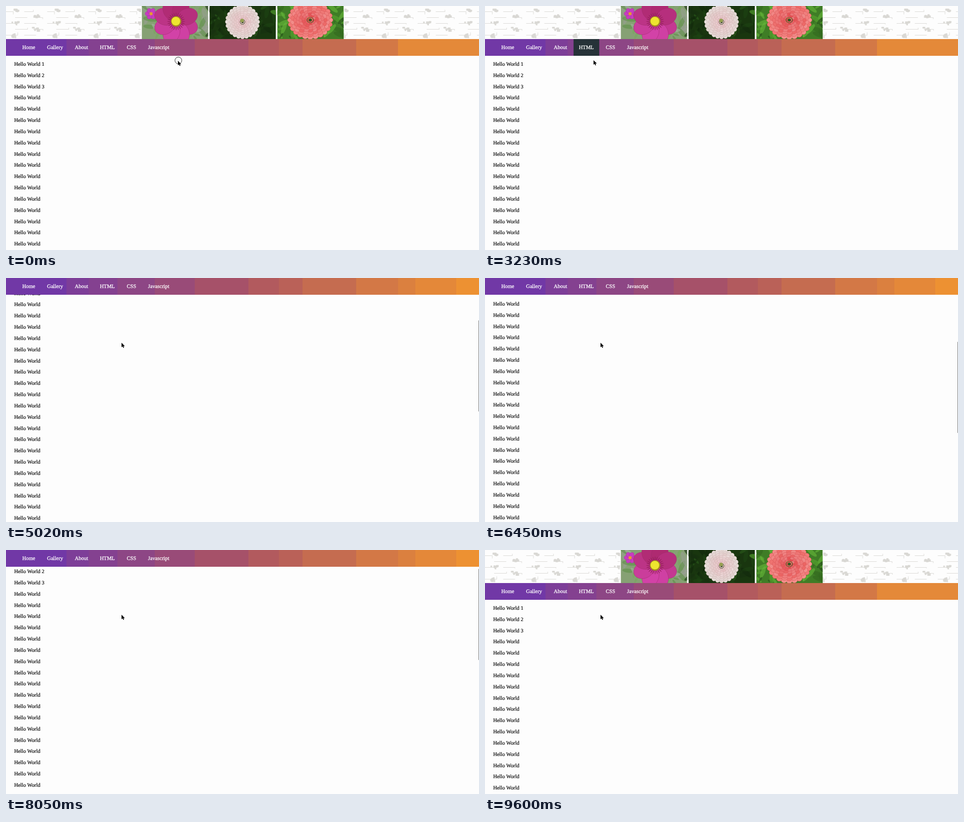
These frames come from a looping animation (1040 px wide and 539 px high, 9830 ms). An HTML page:

```html
<!DOCTYPE html>
<html lang="en">
<head>
<meta charset="utf-8">
<title>Sticky navigation</title>
<style>
  html, body { margin: 0; width: 100%; height: 100%; overflow: hidden; background: #fdfdfd; }
  svg { display: block; width: 100%; height: 100%; }
  text { font: 11.68px "Liberation Serif", "Times New Roman", serif; text-rendering: geometricPrecision; stroke: #000; stroke-width: .2px; }
  #nav text { fill: #fff; stroke: #fff; stroke-width: .3px; }
</style>
</head>
<body>
<svg viewBox="0 0 1040 539">
  <defs>
    <pattern id="bricks" width="90.5" height="73" patternUnits="userSpaceOnUse"></pattern>
    <clipPath id="photoClip"><path d="M298.5 0h146v73h-146zM447.5 0h146v73h-146zM596.5 0h146v73h-146z"/></clipPath>
  </defs>
  <g id="header">
    <rect width="1040" height="73" fill="url(#bricks)"/>
    <rect x="297" width="447" height="73" fill="#fdfdfd"/>
    <g id="photos" clip-path="url(#photoClip)"></g>
  </g>
  <g id="rows"></g>
  <g id="nav"></g>
  <rect id="bar" x="1039" y="2" width="1" height="201" fill="#707070"/>
  <circle id="ring" cx="379" cy="120.3" r="7.5" fill="none" stroke="#222"/>
  <path id="cursor" d="M0 0V10L2.4 8 4 11.5 5.6 10.8 4.2 7.4H7.3Z" stroke="#fff" stroke-width=".8" paint-order="stroke"/>
</svg>
<script>
const LOOP = 9830, NAV_Y = 73, NAV_H = 37, ROW = 24.83;
const $ = id => document.getElementById(id);

function add(parent, tag, attrs, text) {
  const node = document.createElementNS('http://www.w3.org/2000/svg', tag);
  for (const key in attrs) node.setAttribute(key, attrs[key]);
  if (text) node.textContent = text;
  return parent.appendChild(node);
}

let seed = 7;
function random(low, high) {
  seed = seed * 16807 % 2147483647;
  return low + (high - low) * seed / 2147483647;
}
const pick = list => list[Math.floor(random(0, list.length))];
const mix = (a, b, p) => a.map((v, i) => v + (b[i] - v) * p);
const rgb = c => `rgb(${c.map(Math.round)})`;

// Wallpaper: broken brick lines with rough blots
const wall = $('bricks'), GREY = '#d9d8d4';
for (let y = 12.5, i = 0; y < 73; y += 13, i++) {
  for (let x = i % 2 * 20; x < 80; x += 40) {
    add(wall, 'path', { d: `M${x} ${y}h${random(16, 30)}v${random(-7, 7)}`, fill: 'none', stroke: GREY });
  }
}
for (let i = 0; i < 5; i++) {
  const x = i % 2 * 45 + 20, y = 9 + i * 14;
  for (let k = 0; k < 6; k++) {
    add(wall, 'rect', { x: x + random(-9, 4), y: y + random(-5, 1), width: random(3, 8), height: random(3, 6), rx: 1, fill: GREY });
  }
}

// Photos
const photos = $('photos');
function backdrop(index, base, leaves) {
  const left = 298.5 + 149 * index;
  add(photos, 'rect', { x: left, width: 146, height: 73, fill: base });
  for (let i = 0; i < 60; i++) {
    const length = random(12, 34);
    add(photos, 'ellipse', {
      rx: length / 2, ry: length / 6, fill: pick(leaves), opacity: .6,
      transform: `translate(${left + random(0, 146)} ${random(0, 73)}) rotate(${random(0, 360)})`
    });
  }
}
function petal(cx, cy, angle, near, far, width, fill, stroke = 'none', squash = 1) {
  add(photos, 'ellipse', {
    cx: (near + far) / 2, rx: (far - near) / 2, ry: width, fill, stroke, 'stroke-width': .5,
    transform: `translate(${cx} ${cy}) scale(1 ${squash}) rotate(${angle})`
  });
}
function dahlia(cx, cy, radius, squash, outer, inner, edge) {
  const rings = 8;
  for (let i = 0; i < rings; i++) {
    const far = radius * (1 - i / rings), count = 24 - 2 * i;
    for (let k = 0; k < count; k++) {
      const colour = mix(mix(outer, inner, i / rings), [255, 255, 255], random(0, .25));
      petal(cx, cy, (k + i % 2 / 2) * 360 / count, far * .6, far, far * 3.6 / count, rgb(colour), edge, squash);
    }
  }
}

backdrop(0, '#86a174', ['#5f9148', '#a7b3a5', '#78a85e', '#9a9f94']);
for (let a = 0; a < 360; a += 60) petal(319, 17, a, 1, 13, 5, '#c83cc0', '#9f2f9b');
add(photos, 'circle', { cx: 319, cy: 17, r: 3.5, fill: '#e59a32' });
for (let a = 22; a < 382; a += 45) {
  const light = (1 + Math.cos((a - 100) * Math.PI / 180)) / 2;
  petal(374, 34, a, 4, 50, 18, rgb(mix([174, 42, 112], [210, 66, 168], light)), '#9c2c69');
}
for (let a = 0; a < 360; a += 15) petal(374, 34, a, 8, 20, .8, '#941f5b');
add(photos, 'circle', { cx: 374, cy: 34, r: 11.5, fill: '#a58b20' });
add(photos, 'circle', { cx: 373.5, cy: 33.5, r: 9.5, fill: '#eee52f' });

backdrop(1, '#19360f', ['#2a5a1c', '#10270b', '#1d4313', '#17300f']);
dahlia(520, 35, 38, 1, [226, 214, 210], [232, 178, 186], '#c9b0ac');
add(photos, 'circle', { cx: 519, cy: 32, r: 4, fill: '#96a052' });

backdrop(2, '#3f7d26', ['#58a62f', '#244c1a', '#66b83a', '#33681f']);
dahlia(669, 31, 50, .86, [240, 112, 108], [224, 66, 72], '#d24e50');

// Text rows
for (let i = 0; i < 50; i++) {
  add($('rows'), 'text', { x: 18, y: 132 + ROW * i }, 'Hello World' + (i < 3 ? ' ' + (i + 1) : ''));
}

// Navigation: a gradient reduced to flat bands
const nav = $('nav');
function gradient(x) {
  const purple = [104, 52, 176], rose = [172, 84, 98], orange = [240, 148, 48];
  return rgb(x < 520 ? mix(purple, rose, x / 520) : mix(rose, orange, (x - 520) / 520));
}
function bands(parent, edges) {
  edges.forEach((x, i) => {
    const end = edges[i + 1] || 1040;
    add(parent, 'rect', { x, width: 1040 - x, height: NAV_H, fill: gradient((x + end) / 2) });
  });
}
bands(nav, [0, 133, 182, 245, 327, 415, 533, 600, 652, 770, 862]);
const tail = add(nav, 'g');
bands(tail, [862, 900, 990]);

let nextX = 35.7;
const items = ['Home', 'Gallery', 'About', 'HTML', 'CSS', 'Javascript'].map(label => {
  const hover = add(nav, 'rect', { height: NAV_H, fill: '#263238' });
  const text = add(nav, 'text', { x: nextX, y: 22 }, label);
  const left = nextX - 11.7, width = text.getComputedTextLength() + 23.4;
  hover.setAttribute('x', left);
  hover.setAttribute('width', width);
  nextX += width + 2.6;
  return { hover, left, right: left + width };
});

// Motion keys: time, values, and the number of jumps until the next key (0 glides)
const scrollKeys = [
  [0, [0], 1], [3910, [9], 1], [3970, [23.5], 6], [5020, [243.3], 5], [5910, [400], 1],
  [6270, [400], 6], [7340, [214.5], 6], [8410, [-3], 4], [9030, [0], 1]
];
const cursorKeys = [
  [0, [378, 121], 1], [410, [378, 121], 0], [1200, [337, 94], 1], [1710, [337, 94], 0],
  [2110, [272, 97], 1], [2470, [272, 97], 0], [2850, [223, 96], 1], [3120, [223, 96], 0], [3340, [254, 143], 1]
];

function track(keys, time) {
  const i = keys.findLastIndex(key => key[0] <= time);
  const [start, from, jumps] = keys[i];
  const [end, to] = keys[i + 1] || [LOOP, from];
  const p = (time - start) / (end - start);
  return mix(from, to, jumps ? Math.floor(p * jumps + 1e-6) / jumps : p);
}
const place = (node, x, y) => node.setAttribute('transform', `translate(${x} ${y})`);
const show = (node, visible) => node.setAttribute('visibility', visible ? 'visible' : 'hidden');

function render(time) {
  const [scroll] = track(scrollKeys, time);
  place($('header'), 0, -scroll);
  place($('rows'), 0, -scroll);
  place(nav, 0, Math.max(0, NAV_Y - scroll));
  place($('bar'), 0, Math.max(0, scroll * .377));
  show(tail, scroll > 10);
  show($('bar'), time >= 3910 && time < 9600);
  show($('ring'), time < 50);
  place($('cursor'), ...track(cursorKeys, time));

  // the highlight trails the pointer slightly
  const [x, y] = track(cursorKeys, Math.max(0, time - 80));
  for (const { hover, left, right } of items) {
    show(hover, x > left && x < right && y < NAV_Y + NAV_H);
  }
}

const begin = performance.now();
function frame() {
  render((performance.now() - begin) % LOOP);
  requestAnimationFrame(frame);
}
frame();
</script>
</body>
</html>
```
